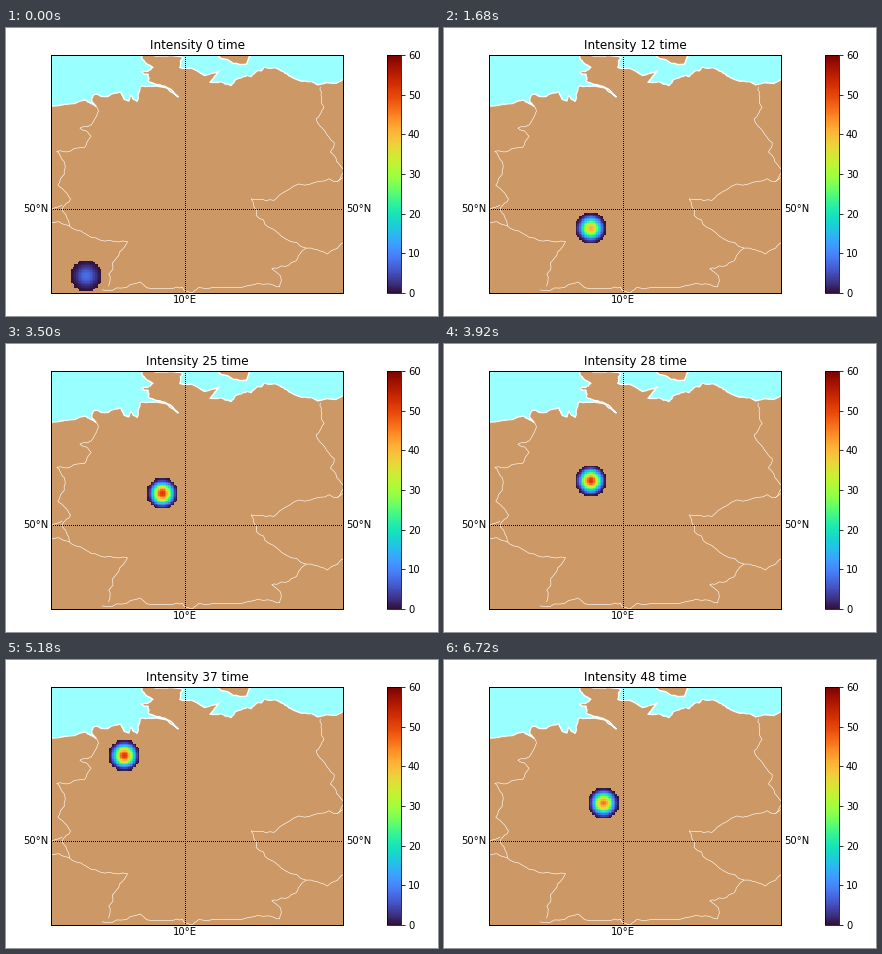
Animation of 432 by 288 pixels, one loop 6860 ms. Source, as a matplotlib script:

```python
import numpy as np
import matplotlib.pyplot as plt
from matplotlib.animation import FuncAnimation

W, H, DPI = 432, 288, 72
FRAMES, INTERVAL = 49, 140
LEFT, TOP, RIGHT, BOTTOM = 45, 27, 337, 265    # map frame in pixels
ORIGIN_X, ORIGIN_Y = 178.6, 181.1              # where 10°E meets 50°N
SCALE = 31.7                                   # pixels per degree
LAND, SEA = "#cc9966", "#99ffff"
rng = np.random.default_rng(4)


def box(left, top, right, bottom):
    return [left / W, 1 - bottom / H, (right - left) / W, (bottom - top) / H]


def lon_of(x):
    return 10 + (x - ORIGIN_X) / SCALE


def lat_of(y):
    return 50 - (y - ORIGIN_Y) / SCALE


def roughen(points, levels=3, amount=0.08):
    """Midpoint displacement: a ragged line through a few key points."""
    line = np.array(points, float)
    for _ in range(levels):
        step = np.diff(line, axis=0)
        normal = np.column_stack([-step[:, 1], step[:, 0]])
        shift = amount * rng.normal(size=(len(step), 1))
        middle = line[:-1] + step / 2 + normal * shift
        line = np.insert(line, np.arange(1, len(line)), middle, axis=0)
    return line


# Key points (longitude, latitude)
NORTH_SEA = [
    (5.5, 53.3), (6.87, 53.44), (7.2, 53.25), (7.07, 53.5), (7.15, 53.62),
    (8.0, 53.71), (8.1, 53.46), (8.25, 53.42), (8.3, 53.6), (8.5, 53.4),
    (8.6, 53.87), (9.3, 53.85), (9.8, 53.54), (9.35, 53.88), (8.85, 54.03),
    (8.85, 54.25), (8.63, 54.33), (9.0, 54.47), (8.65, 54.77), (8.66, 55.1),
]
BALTIC = [
    (9.5, 55.1), (9.45, 54.83), (9.95, 54.78), (9.85, 54.47), (10.2, 54.45),
    (11.1, 54.36), (10.8, 54.0), (11.45, 53.9), (11.6, 54.08), (12.1, 54.18),
    (12.5, 54.47), (12.95, 54.42), (13.4, 54.15), (14.2, 53.92), (15.3, 54.16),
]
ISLAND = [(11.0, 55.0), (11.15, 54.75), (11.95, 54.57), (12.2, 55.0)]
BORDERS = [
    [(7.2, 53.25), (7.05, 52.65), (6.7, 52.55), (7.05, 52.3), (6.85, 51.95),
     (5.97, 51.82), (6.2, 51.5), (6.0, 50.76), (6.4, 50.32), (6.13, 50.0),
     (6.37, 49.47), (7.05, 49.11), (8.2, 48.97), (7.72, 48.3), (7.6, 47.58)],
    [(6.13, 50.13), (5.7, 49.9)],
    [(6.37, 49.47), (5.7, 49.54)],
    [(7.4, 47.45), (8.6, 47.7), (9.6, 47.5), (10.2, 47.35), (10.45, 47.53),
     (12.2, 47.62), (13.0, 47.55), (12.75, 48.12), (13.35, 48.3),
     (13.83, 48.77)],
    [(15.1, 49.0), (14.5, 48.58), (13.83, 48.77), (12.65, 49.43),
     (12.1, 50.32), (13.0, 50.45), (14.3, 50.88), (14.82, 50.87),
     (15.03, 51.25), (14.6, 51.8), (14.72, 52.1), (14.15, 52.85),
     (14.4, 53.2), (14.28, 53.85)],
    [(14.82, 50.87), (15.1, 51.02)],
    [(8.65, 54.9), (9.45, 54.83)],
]

# Storm track: time, longitude, latitude, peak intensity
TRACK = np.array([
    (0, 6.9, 47.9, 8), (12, 9.0, 49.4, 41), (18, 9.9, 50.1, 46),
    (25, 9.3, 51.0, 52), (32, 8.6, 52.0, 52), (37.5, 8.05, 52.8, 52),
    (41, 8.5, 52.4, 52), (48, 9.4, 51.2, 46),
])
CELL, RADIUS = 0.05, 0.5
LONS = np.arange(5.7, 15.15, CELL)
LATS = np.arange(47.2, 55.05, CELL)
GRID_LON, GRID_LAT = np.meshgrid(LONS, LATS)


def storm(i):
    lon, lat, peak = (np.interp(i, TRACK[:, 0], column)
                      for column in TRACK.T[1:])
    r = np.hypot(GRID_LON - round(lon, 1), GRID_LAT - round(lat, 1)) / RADIUS
    value = peak * (1 + np.cos(np.pi * np.minimum(r, 1))) / 2
    return np.ma.masked_where(r > 0.999, value)


plt.rcParams["font.family"] = "DejaVu Sans"
fig = plt.figure(figsize=(W / DPI, H / DPI), dpi=DPI, facecolor="white")
ax = fig.add_axes(box(LEFT, TOP, RIGHT, BOTTOM), facecolor=SEA)


def land(points):
    ax.fill(*np.transpose(points), facecolor=LAND, edgecolor="white",
            linewidth=1.4, joinstyle="round", zorder=1)


land([*roughen(NORTH_SEA), *roughen(BALTIC), (15.3, 47), (5.5, 47)])
land(roughen(ISLAND))
for border in BORDERS:
    ax.plot(*roughen(border).T, color="white", lw=0.6, zorder=2)

half = CELL / 2
image = ax.imshow(storm(0), cmap="turbo", vmin=0, vmax=60, origin="lower",
                  extent=(LONS[0] - half, LONS[-1] + half,
                          LATS[0] - half, LATS[-1] + half),
                  interpolation="nearest", aspect="auto", zorder=3)

# The half-pixel offset keeps each dot on one pixel
dots = dict(color="black", lw=1, linestyle=(0.5, (1, 1)), zorder=4)
ax.axhline(50, **dots)
ax.axvline(10, **dots)
ax.set_xlim(lon_of(LEFT), lon_of(RIGHT))
ax.set_ylim(lat_of(BOTTOM), lat_of(TOP))
ax.set_xticks([])
ax.set_yticks([])
for spine in ax.spines.values():
    spine.set_linewidth(1)


def label(x, y, text, ha, va):
    ax.text(lon_of(x), lat_of(y), text, ha=ha, va=va, fontsize=10)


label(LEFT - 3, ORIGIN_Y, "50°N", "right", "center")
label(RIGHT + 3, ORIGIN_Y, "50°N", "left", "center")
label(ORIGIN_X, BOTTOM + 2.4, "10°E", "center", "top")
title = ax.set_title("", fontsize=12)

cax = fig.add_axes(box(381, TOP, 395, BOTTOM))
fig.colorbar(image, cax=cax, ticks=range(0, 61, 10))


def update(i):
    image.set_data(storm(i))
    title.set_text(f"Intensity {i} time")
    return image, title


anim = FuncAnimation(fig, update, frames=FRAMES, interval=INTERVAL,
                     init_func=lambda: update(0), repeat=True)
plt.show()
```
